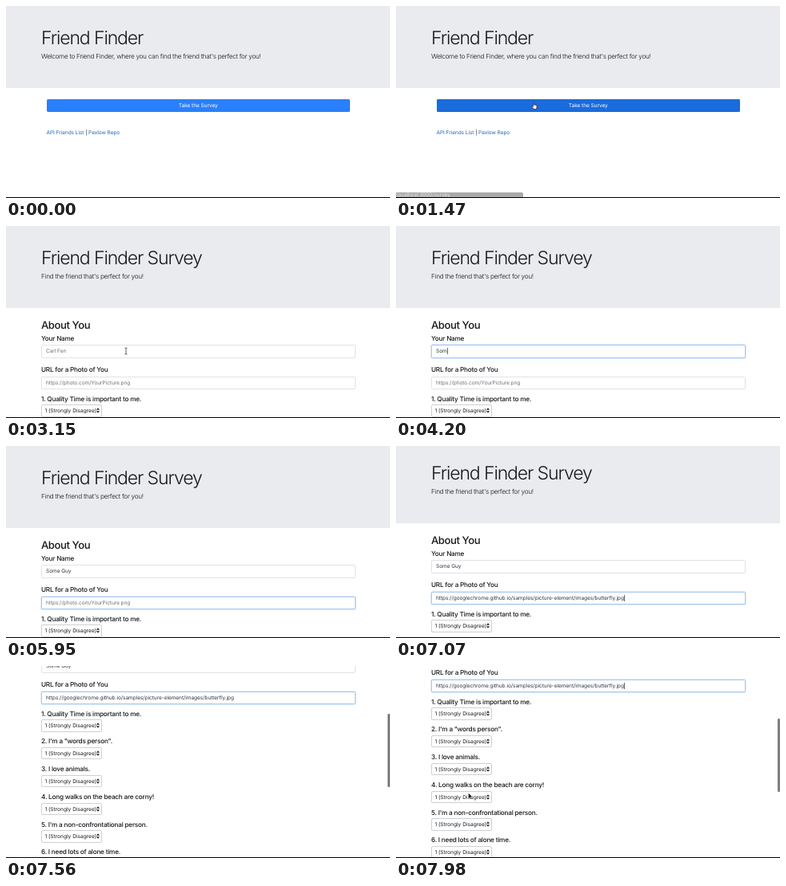
Write an HTML page that moves like this. It is 480 px wide and 241 px high and loops after 8 s.

```html
<!DOCTYPE html>
<html lang="en">
<head>
<meta charset="utf-8">
<title>Friend Finder</title>
<style>
html, body { margin: 0; width: 100%; height: 100%; overflow: hidden; background: #fff; }
#stage {
  position: relative; width: 480px; height: 241px; overflow: hidden; background: #fff;
  font: 400 6.55px/10px Inter, "Open Sans", sans-serif; font-optical-sizing: none;
  text-rendering: geometricPrecision; letter-spacing: -.01em; color: #16181b; white-space: pre;
}
#stage div, #stage svg { position: absolute; box-sizing: border-box; }
.page { inset: 0; }
.hero { left: 0; top: 0; width: 480px; height: 103px; background: #eaebef; }
.hero div { left: 44px; }
.title { top: 25px; font-size: 23px; line-height: 30px; font-weight: 300; letter-spacing: -.048em; }
.lead { top: 58px; font-size: 8.2px; font-weight: 300; letter-spacing: -.036em; }
.head { left: 44px; top: 117px; font-size: 13.1px; line-height: 16px; font-weight: 500; letter-spacing: -.032em; }
.label { left: 44px; font-size: 8.2px; font-weight: 500; letter-spacing: -.026em; }
.btn {
  left: 50.5px; top: 116.5px; width: 379.5px; height: 16.5px; border-radius: 1.8px;
  background: #2a80fa; color: #fff; line-height: 16.5px; text-align: center; overflow: hidden;
}
.btn span { position: relative; }
#hover { inset: 0; background: #1a6bdc; }
.links { left: 50.5px; top: 153.5px; }
.links span { color: #2268b4; }
.field {
  left: 44px; width: 393px; height: 16.4px; padding-left: 5px; line-height: 15.6px;
  border: 1px solid #dfe2e6; border-radius: 1.8px; background: #fff; color: #33383d;
}
.field .ph { color: #6c7278; }
.ring { inset: -1px; border: 1px solid #a6c8f1; border-radius: 1.8px; box-shadow: 0 0 0 1px rgba(60, 140, 245, .17); }
.caret { display: inline-block; width: .8px; height: 8px; margin-right: -.8px; vertical-align: middle; background: #666; }
.select {
  left: 44px; width: 75.5px; height: 15.4px; padding-left: 3.4px; line-height: 14px;
  border: 1px solid #cdd0d3; border-radius: 2px; background: #fff; letter-spacing: .003em;
}
.select svg { right: 1.2px; top: 3.2px; }
#thumb { left: 477px; width: 2.6px; height: 92px; border-radius: 1.3px; background: #7f7f7f; }
#status {
  left: 0; top: 234px; width: 159px; height: 7px; padding-left: 1px; line-height: 7px;
  border-radius: 0 2px 0 0; background: #000; color: #b5b5b5; font-size: 6.4px;
}
.edge { left: 0; top: 240px; width: 480px; height: 1px; background: #000; }
#cursor { left: 0; top: 0; width: 10px; height: 11px; overflow: visible; }
</style>
</head>
<body>
<div id="stage">
  <div id="home" class="page">
    <div class="hero">
      <div class="title">Friend Finder</div>
      <div class="lead">Welcome to Friend Finder, where you can find the friend that's perfect for you!</div>
    </div>
    <div class="btn"><div id="hover"></div><span>Take the Survey</span></div>
    <div class="links"><span>API Friends List</span> | <span>Pexlow Repo</span></div>
  </div>
  <div id="survey" class="page">
    <div class="hero">
      <div class="title">Friend Finder Survey</div>
      <div class="lead">Find the friend that's perfect for you!</div>
    </div>
    <div class="head">About You</div>
    <div class="label" style="top:136px">Your Name</div>
    <div class="field" id="name" style="top:149.2px"><div class="ring"></div><span class="val"></span><i class="caret"></i><span class="ph">Carl Fen</span></div>
    <div class="label" style="top:175.4px">URL for a Photo of You</div>
    <div class="field" id="photo" style="top:188.8px"><div class="ring"></div><span class="val"></span><i class="caret"></i><span class="ph">https://photo.com/YourPicture.png</span></div>
  </div>
  <div id="thumb"></div>
  <div id="status">localhost:3000/survey</div>
  <div class="edge"></div>
  <svg id="cursor" viewBox="0 0 10 11">
    <path id="arrow" d="M0 0V7L1.6 5.6L2.7 8L3.8 7.5L2.8 5.2H5Z" fill="#000" stroke="#fff" stroke-width=".5"/>
    <path id="hand" d="M1.5 4.6V.9Q2.1 0 2.7 .9V3.2Q3.4 2.7 3.9 3.4Q4.6 3 5 3.7Q5.9 3.5 6 4.4V6.2L5.2 8.5H2L.1 5.6Q-.3 4.5 .7 4.6L1.5 5.5Z" fill="#fff" stroke="#222" stroke-width=".7"/>
    <path id="beam" d="M-1.5 -4Q0 -4 0 -3Q0 -4 1.5 -4M0 -3V3M-1.5 4Q0 4 0 3Q0 4 1.5 4" fill="none" stroke="#222" stroke-width=".7"/>
  </svg>
</div>
<script>
const LOOP = 8000, TICK = 70;
const $ = id => document.getElementById(id);
const show = (el, on) => { el.style.visibility = on ? 'visible' : 'hidden'; };
const ramp = (t, a, b) => Math.min(1, Math.max(0, (t - a) / (b - a)));

// Linear interpolation through [time, ...values] points
function track(points, t) {
  const i = points.findIndex(p => p[0] > t);
  if (i < 0) return points[points.length - 1].slice(1);
  if (i === 0) return points[0].slice(1);
  const a = points[i - 1], b = points[i], k = ramp(t, a[0], b[0]);
  return a.slice(1).map((v, j) => v + (b[j + 1] - v) * k);
}

const questions = [
  'Quality Time is important to me.', 'I\'m a "words person".', 'I love animals.',
  'Long walks on the beach are corny!', 'I\'m a non-confrontational person.', 'I need lots of alone time.'
];
questions.forEach((q, i) => {
  const y = 216.5 + i * 34.75;
  $('survey').insertAdjacentHTML('beforeend',
    `<div class="label" style="top:${y - 5}px">${i + 1}. ${q}</div>
     <div class="select" style="top:${y + 7.8}px">1 (Strongly Disagree)<svg width="4" height="7" viewBox="0 0 4 7"><path d="M0 2.8L2 .2L4 2.8ZM0 4.2L2 6.8L4 4.2Z" fill="#222"/></svg></div>`);
});

const path = [
  [70, 476, 234], [350, 385, 192], [630, 230, 136], [840, 174, 121], [980, 171, 120],
  [1470, 170, 121], [2100, 166, 129], [2310, 166, 129], [3010, 150, 157], [3150, 150, 157], [3430, 138, 200]
];
const scroll = [
  [7000, 0], [7070, 6], [7140, 32], [7210, 68], [7280, 99], [7350, 122],
  [7490, 149], [7630, 165], [7770, 172]
];
const LOAD = 1750;
const fields = [
  { id: 'name', focus: 3290, blur: 5440, text: 'Some Guy', keys: [3780, 3920, 4130, 4410, 4550, 4760, 4970, 5250] },
  { id: 'photo', focus: 5440, blur: LOOP, keys: [6580],
    text: 'https://googlechrome.github.io/samples/picture-element/images/butterfly.jpg' }
];

function drawField({ id, focus, blur, text, keys }, t) {
  const el = $(id), part = c => el.querySelector(c);
  const hits = keys.filter(k => k <= t);
  const value = hits.length === keys.length ? text : text.slice(0, hits.length);
  const since = t - (hits.length ? hits[hits.length - 1] : focus);
  part('.val').textContent = value;
  part('.ph').style.display = value ? 'none' : '';
  part('.caret').style.opacity = +(t >= focus && t < blur && since % 1000 < 500);
  part('.ring').style.opacity = ramp(t, focus, focus + 150) * (1 - ramp(t, blur, blur + 150));
}

function drawCursor(t) {
  const back = t >= 7980;
  const [x, y] = back ? [90.5, 159.3] : track(path, t);
  const overBtn = t < LOAD && y > 116 && y < 133 && x < 430;
  const kind = back ? 'arrow' : t < LOAD ? (overBtn ? 'hand' : 'arrow')
    : t < 2380 ? 'hand' : y > 149 ? 'beam' : 'arrow';
  const on = back || (t >= 70 && t < 3780);
  for (const k of ['arrow', 'hand', 'beam']) show($(k), on && k === kind);
  $('cursor').style.transform = `translate(${x}px, ${y}px)`;
}

function draw(now) {
  const t = Math.floor(now % LOOP / TICK) * TICK;
  const [y] = track(scroll, t);
  $('home').style.display = t < LOAD ? '' : 'none';
  $('survey').style.display = t < LOAD ? 'none' : '';
  $('hover').style.opacity = ramp(t, 630, 780);
  $('survey').style.transform = `translateY(${-y}px)`;
  $('thumb').style.top = y * .38 + .6 + 'px';
  show($('thumb'), t >= 7140);
  $('status').style.opacity = ramp(t, 1400, 1610) * (1 - ramp(t, 2310, 2590));
  fields.forEach(f => drawField(f, t));
  drawCursor(t);
}

const start = performance.now();
function frame() {
  draw(performance.now() - start);
  requestAnimationFrame(frame);
}
frame();
</script>
</body>
</html>
```
